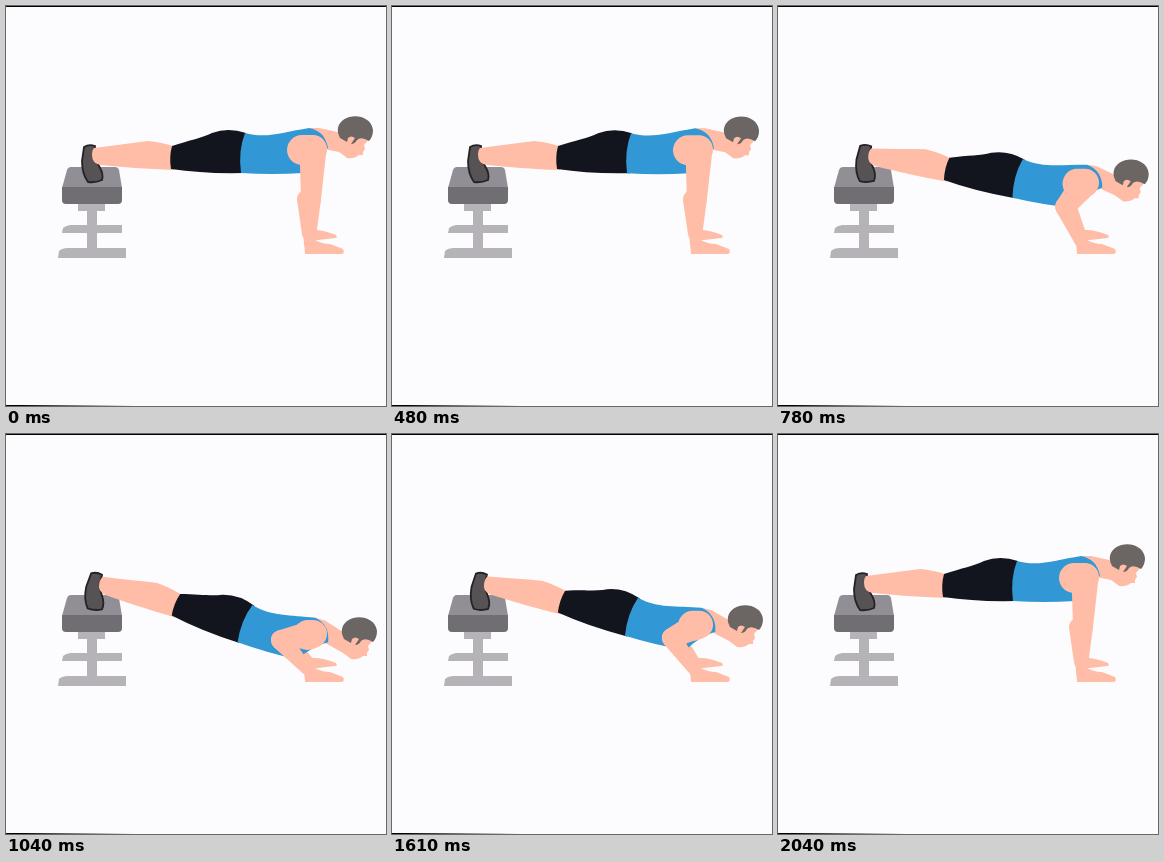
Write an HTML page that moves like this. It is 380 px wide and 400 px high and loops after 2210 ms.

```html
<!DOCTYPE html>
<html lang="en">
<head>
<meta charset="utf-8">
<title>Decline push-up</title>
<style>
  html, body { margin: 0; width: 100%; height: 100%; overflow: hidden; background: #fcfcfe; }
  svg { display: block; width: 100vw; height: 100vh; }
  .skin { fill: #ffbda7; }
</style>
</head>
<body>
<svg viewBox="0 0 380 400">
  <rect width="380" height="400" fill="#fcfcfe"/>
  <rect width="380" height="1" fill="#000"/>
  <path d="M0 399H14L128 400H0Z"/>

  <g fill="#b5b3b7">
    <path d="M72 197H99V205H91V242H120V252H52L53 245Q56 242 62 242H81V205H72Z"/>
    <path d="M56 227L57 222Q59 220 64 219H116V227Z"/>
  </g>
  <path d="M61 164Q62 161 65 161H109Q112 161 113 164L116 182H56Z" fill="#918f95"/>
  <path d="M56 181H116V194Q116 198 112 198H60Q56 198 56 194Z" fill="#706e72"/>

  <!-- Body parts are drawn in the raised pose and moved from there. -->
  <g class="skin">
    <path id="farForearm"/>
    <path d="M298 224H309Q317 224 330 229Q332 232 329 232L312 234H300Z"/>
  </g>
  <path id="shoe" d="M77 141Q82 138 88 140Q87 152 92 160Q97 168 95 174Q88 177 81 176Q75 168 75 155Z"
        fill="#575254" stroke="#242226" stroke-width="1.8"/>
  <path id="calf" class="skin" d="M88 142C106 140 124 137 142 135Q155 136 170 141L168 164C140 163 116 161 95 159Q86 158 86 149Q86 144 88 142Z"/>
  <path id="thigh" fill="#12151e" d="M166 140C184 134 196 132 206 127Q222 121 240 127L238 167Q198 168 165 163Q163 151 166 140Z"/>
  <path id="neck" class="skin"/>
  <path id="torso" fill="#3298d5" d="M239 127C260 133 278 126 303 122Q319 125 322 142Q308 150 297 167Q266 169 235 167Q232 145 239 127Z"/>
  <g id="head">
    <path class="skin" d="M338 128L336 147L341 152Q348 153 353 149H357V146L359 143L358 139L365 131Z"/>
    <path fill="#6b6564" d="M334 132Q331 126 332 122C335 106 365 106 367 124Q367 131 363 135Q355 130 351 134Q349 138 345 138L349 132Q345 129 342 132L341 136Z"/>
  </g>
  <g class="skin">
    <path id="shoulderCap"/>
    <path id="upperArm"/>
    <path id="forearm"/>
    <path d="M298 234H309Q316 238 324 238L337 243Q339 247 336 248H299Z"/>
  </g>
</svg>
<script>
const LOOP = 2210, DOWN_AT = 480, UP_AT = 1480, STEP = 43.3, STEPS = 13;

const part = Object.fromEntries([...document.querySelectorAll('[id]')].map(node => [node.id, node]));
const lerp = (a, b, p) => a + (b - a) * p;
const between = (a, b, p) => a.map((v, i) => lerp(v, b[i], p));

// Moves a raised-pose point along with a body segment turned about its joint.
function segment(from, to, degrees) {
  const a = degrees * Math.PI / 180, cos = Math.cos(a), sin = Math.sin(a);
  return {
    transform: `translate(${to}) rotate(${degrees}) translate(${-from[0]} ${-from[1]})`,
    place([x, y]) {
      const dx = x - from[0], dy = y - from[1];
      return [to[0] + dx * cos - dy * sin, to[1] + dx * sin + dy * cos];
    }
  };
}

// Tapered limb around two circles, the first being the larger.
function limb([ax, ay], ar, [bx, by], br) {
  const dx = bx - ax, dy = by - ay;
  const turn = Math.atan2(dy, dx), spread = Math.acos((ar - br) / Math.hypot(dx, dy));
  const rim = (x, y, r, a) => [x + r * Math.cos(a), y + r * Math.sin(a)];
  return `M${rim(ax, ay, ar, turn + spread)}A${ar} ${ar} 0 1 1 ${rim(ax, ay, ar, turn - spread)}` +
    `L${rim(bx, by, br, turn - spread)}A${br} ${br} 0 0 1 ${rim(bx, by, br, turn + spread)}Z`;
}

// Progress of one movement, held at a film-like step rate.
function travel(t, start) {
  const step = Math.floor((t - start) / STEP + 0.1);
  if (step < 0) return 0;
  const u = (Math.min(step, STEPS) + 0.6) / (STEPS + 0.6);
  return (1 - Math.cos(Math.PI * u)) / 2;
}

const ANKLE = [90, 150], KNEE = [166, 152], HIP = [236, 147];

function draw(t) {
  const p = travel(t, DOWN_AT) - travel(t, UP_AT);

  const shoe = segment([88, 174], [89, 174], 12 * p);
  const calf = segment(ANKLE, between(ANKLE, [97, 151], p), 14 * p);
  const thigh = segment(KNEE, calf.place(KNEE), 19 * p);
  const torso = segment(HIP, thigh.place(HIP), 16 * p);
  const head = segment([0, 0], [4 * (1 - (1 - p) ** 3), 73 * p], 0);
  for (const [name, { transform }] of Object.entries({ shoe, calf, thigh, torso, head }))
    part[name].setAttribute('transform', transform);

  const neck = [
    ...[[318, 143], [303, 122], [313, 122]].map(torso.place),
    ...[[336, 127], [350, 145], [340, 151], [333, 146]].map(head.place)
  ];
  part.neck.setAttribute('d', `M${neck.join('L')}Z`);

  const shoulder = between([307, 143], [307, 200], p);
  const cap = between([296, 144], [302, 201], p);
  const elbow = between([305, 193], [275, 206], p);
  const farElbow = between([300, 193], [284, 211], p);
  part.shoulderCap.setAttribute('d', limb(cap, 15, shoulder, 14));
  part.upperArm.setAttribute('d', limb(shoulder, 13.5, elbow, 10));
  part.forearm.setAttribute('d', limb(elbow, 10, [303.5, 238], 5.5));
  part.farForearm.setAttribute('d', limb(farElbow, 9, [302, 228], 6));
}

const begin = performance.now();
function tick() {
  draw((performance.now() - begin) % LOOP);
  requestAnimationFrame(tick);
}
tick();
</script>
</body>
</html>
```
